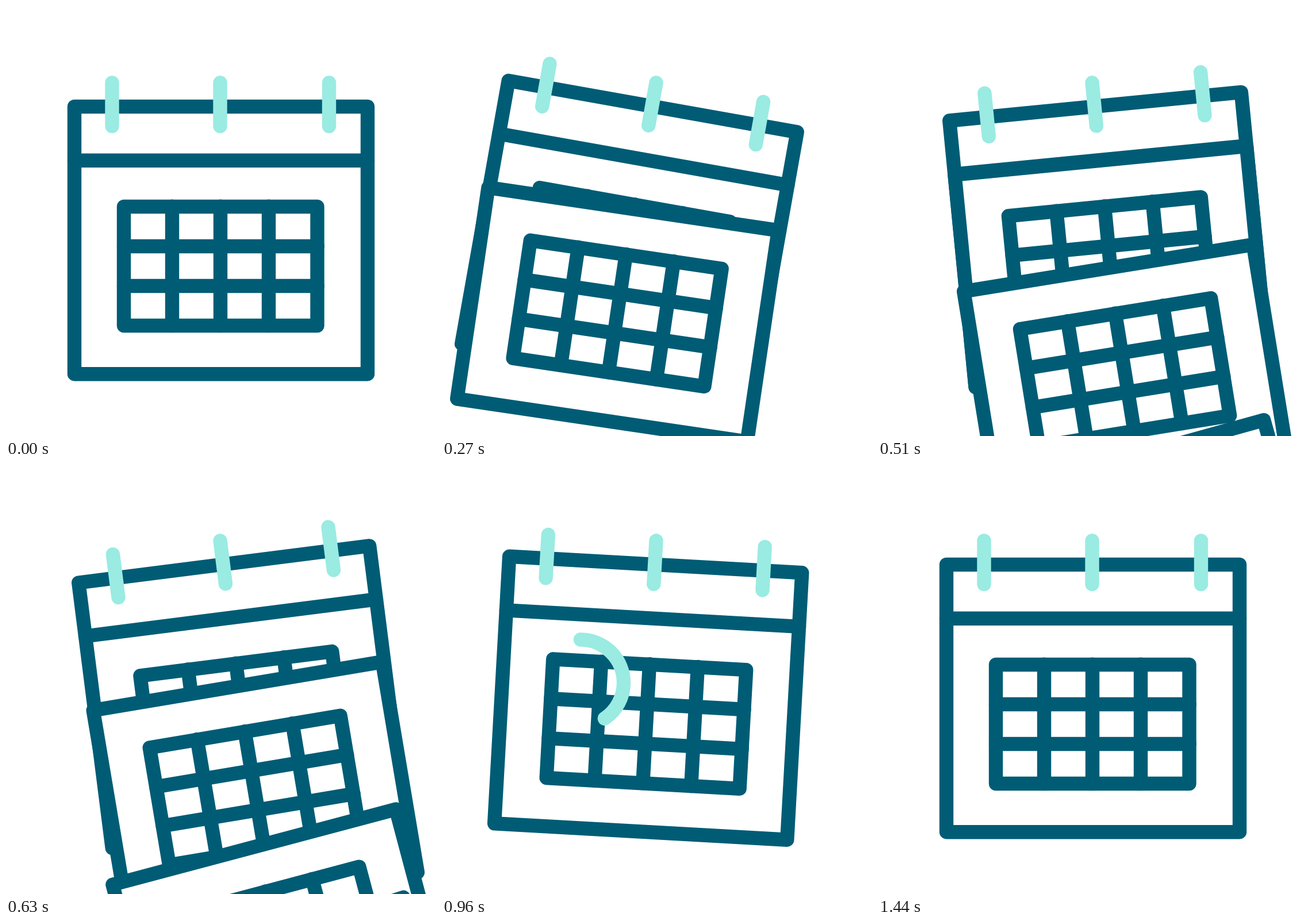
Write an HTML page with a canvas that moves like this. It is 748 by 748 pixels and loops after 1500 ms.

```html
<!DOCTYPE html>
<html lang="en">
<head>
<meta charset="utf-8">
<title>Calendar</title>
<style>
  html, body { margin: 0; width: 100%; height: 100%; overflow: hidden; background: #fff; }
  canvas { display: block; width: 748px; height: 748px; }
</style>
</head>
<body>
<canvas id="stage" width="748" height="748"></canvas>
<script>
const ctx = document.getElementById('stage').getContext('2d');
const DARK = '#005c75', MINT = '#9aebe2';
const LOOP = 1500, STEP = 30;
const RAD = Math.PI / 180;
const PIVOT = { x: 372.5, y: 133.5 };
const DROP = 565;

// Turning points of the swing: time in ms, angle in degrees
const SWING = [[90, 0], [270, 10.1], [585, -8.2], [850, 4.5], [1160, 0]];

// Each falling page: start and end in ms, topmost page last
const PAGES = [[500, 939], [328, 799], [166, 583]];

// Eased progress from 0 to 1 between two times
function ease(t, from, to) {
  const u = Math.min(1, Math.max(0, (t - from) / (to - from)));
  return u * u * (3 - 2 * u);
}

function swing(t) {
  let angle = 0;
  for (let i = 1; i < SWING.length; i++) {
    const [t0, a] = SWING[i - 1], [t1, b] = SWING[i];
    angle += (b - a) * ease(t, t0, t1);
  }
  return angle;
}

function line(x0, y0, x1, y1) {
  ctx.beginPath();
  ctx.moveTo(x0, y0);
  ctx.lineTo(x1, y1);
  ctx.stroke();
}

function box(x, y, w, h) {
  ctx.fillRect(x, y, w, h);
  ctx.strokeRect(x, y, w, h);
}

function grid() {
  box(205, 349, 336.5, 207);
  for (let i = 1; i < 4; i++) line(205 + 84 * i, 348.6, 205 + 84 * i, 556);
  for (let i = 1; i < 3; i++) line(205, 349 + 69 * i, 541.7, 349 + 69 * i);
}

function page(dy) {
  ctx.save();
  ctx.translate(374 + dy * .038, 454.5 + dy);
  ctx.rotate(-dy / 52 * RAD);
  ctx.translate(-374, -454.5);
  box(119, 268.7, 510, 371.5);
  grid();
  ctx.restore();
}

function calendar(t) {
  ctx.save();
  ctx.translate(PIVOT.x, PIVOT.y);
  ctx.rotate(swing(t) * RAD);
  ctx.translate(-PIVOT.x, -PIVOT.y);
  ctx.strokeStyle = DARK;
  box(119, 175, 510, 465.2);
  line(119, 268.7, 629, 268.7);
  grid();
  for (const [from, to] of PAGES) {
    if (t > from) page(DROP * ease(t, from, to));
  }
  ctx.strokeStyle = MINT;
  for (const x of [184.5, PIVOT.x, 562]) line(x, 133.5, x, 209);
  ctx.restore();
}

// A ring around the first day, drawn clockwise and wiped off behind
function ring(t) {
  const turn = 576, top = -90;
  const head = turn * ease(t, 783, 1321);
  const tail = turn * ease(t, 1010, 1440);
  if (head <= tail) return;
  ctx.strokeStyle = MINT;
  ctx.beginPath();
  ctx.arc(241, 380.5, 75, (top + tail) * RAD, (top + head) * RAD);
  ctx.stroke();
}

function draw(now) {
  const t = Math.floor((now % LOOP) / STEP) * STEP;
  ctx.fillStyle = '#fff';
  ctx.fillRect(0, 0, 748, 748);
  ctx.lineWidth = 24.4;
  ctx.lineCap = ctx.lineJoin = 'round';
  calendar(t);
  ring(t);
}

const start = performance.now();
function tick() {
  draw(performance.now() - start);
  requestAnimationFrame(tick);
}
tick();
</script>
</body>
</html>
```
